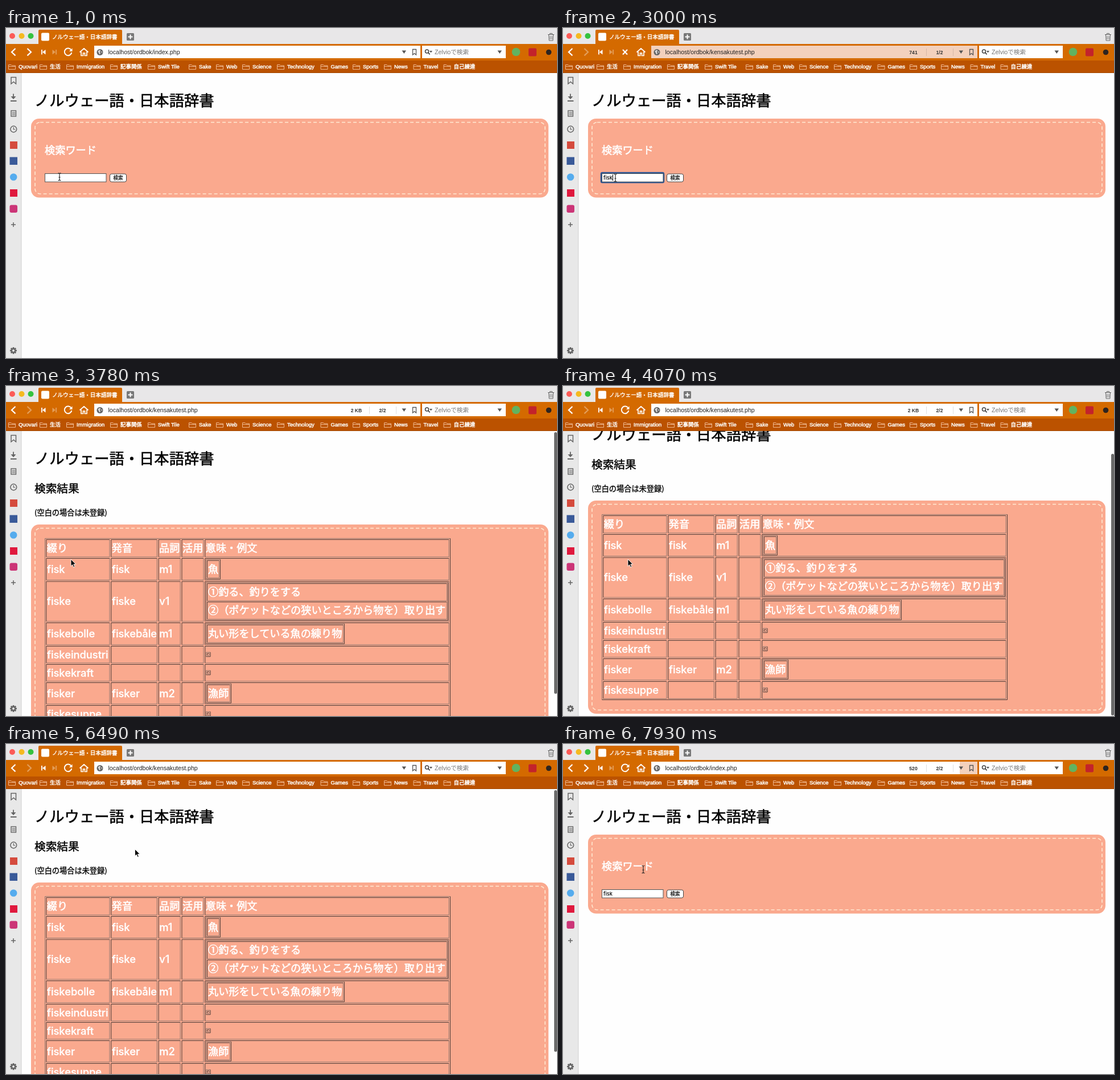
These frames come from a looping animation (968 by 579 pixels, 8 s). An HTML page:

```html
<!DOCTYPE html>
<html lang="ja">
<head>
<meta charset="utf-8">
<title>辞書</title>
<style>
html, body { margin: 0; width: 100%; height: 100%; overflow: hidden; background: #fff; }
svg { display: block; width: 100vw; height: 100vh; }
text { white-space: pre; }
.ui { font-family: 'Liberation Sans', 'Noto Sans CJK JP', 'Noto Sans CJK', sans-serif; }
.ja { font-family: 'Noto Sans CJK JP', 'Noto Sans CJK', sans-serif; }
.en { font-family: Inter, 'Noto Sans', sans-serif; font-weight: 500; }
</style>
</head>
<body>
<svg id="stage" viewBox="0 0 968 579" preserveAspectRatio="none"></svg>
<script>
const rect = (x, y, w, h, fill, more = '') =>
  `<rect x="${x}" y="${y}" width="${w}" height="${h}" fill="${fill}" ${more}/>`;
const disc = (x, y, r, fill, more = '') => `<circle cx="${x}" cy="${y}" r="${r}" fill="${fill}" ${more}/>`;
const line = (d, color, width = 1, more = '') =>
  `<path d="${d}" fill="none" stroke="${color}" stroke-width="${width}" ${more}/>`;
const shape = (d, fill, more = '') => `<path d="${d}" fill="${fill}" ${more}/>`;
// y is the optical middle of the line
const text = (x, y, s, size, fill, cls = 'ui', bold = 0, more = '') =>
  `<text class="${cls}" x="${x}" y="${y + size * .37}" font-size="${size}" fill="${fill}" ` +
  `stroke="${fill}" stroke-width="${bold}" ${more}>${s}</text>`;
const group = (id, body) => `<g id="${id}">${body}</g>`;

const ORANGE = '#d46a00', SALMON = '#faa98e', GREY = '#646464', DARK = '#3a3230', LIGHT = '#85736b';

function card(y, h) {
  return rect(44, y, 909, h, SALMON, 'rx="14"') +
    rect(51, y + 6.5, 896, h - 13, 'none', 'rx="9" stroke="#ffe9d2" stroke-width="1.6" stroke-dasharray="6 4"');
}

function searchForm() {
  return card(159, 138.5) +
    text(68, 214, '検索ワード', 18.2, '#fff', 'ja', .6) +
    rect(67, 254, 110, 17, 'none', 'id="ring" rx="2" stroke="#2b5797" stroke-width="2.4"') +
    rect(68.5, 255.5, 107.5, 14.5, '#fff', 'stroke="#555"') +
    text(71, 263, '', 9.2, '#000', 'en', 0, 'id="typed"') +
    rect(71, 257, 1, 11, '#000', 'id="caret"') +
    rect(182.5, 256, 29, 14, '#fff', 'rx="3" stroke="#444"') +
    text(197, 263, '検索', 8.6, '#000', 'ja', .2, 'text-anchor="middle"');
}

// Bevelled one-pixel borders, as browsers draw them around tables and cells
const bevel = (x1, y1, x2, y2, upper, lower) =>
  line(`M${x1 + .5} ${y2 - .5}V${y1 + .5}H${x2 - .5}`, upper, .9) +
  line(`M${x1 + .5} ${y2 - .5}H${x2 - .5}V${y1 + .5}`, lower, .9);
const inset = (x1, y1, x2, y2) => bevel(x1, y1, x2, y2, DARK, LIGHT);
const outset = (x1, y1, x2, y2) => bevel(x1, y1, x2, y2, LIGHT, DARK);

function resultTable() {
  const cols = [[70.3, 182.5], [184.3, 265.8], [267.6, 306.7], [308.5, 347.5], [349.3, 778.6]];
  // top, bottom, three short cells, width of the nested list, its lines
  const rows = [
    [302, 341, 'fisk', 'fisk', 'm1', 26, ['魚']],
    [342.5, 413.5, 'fiske', 'fiske', 'v1', 426, ['①釣る、釣りをする', '②（ポケットなどの狭いところから物を）取り出す']],
    [415, 454.5, 'fiskebolle', 'fiskebåle', 'm1', 244, ['丸い形をしている魚の練り物']],
    [456, 486.5, 'fiskeindustri', '', '', 8, []],
    [488, 518.5, 'fiskekraft', '', '', 8, []],
    [520, 558.5, 'fisker', 'fisker', 'm2', 45, ['漁師']],
    [560, 591, 'fiskesuppe', '', '', 8, []]
  ];
  const label = (x, y, s) => text(x, y, s, 18.15, '#fff', 'ja', .6);
  let out = outset(68, 267, 781, 593);
  ['綴り', '発音', '品詞', '活用', '意味・例文'].forEach((s, i) => {
    out += inset(cols[i][0], 269, cols[i][1], 300.5) + label(cols[i][0] + 1.5, 284.5, s);
  });
  for (const [top, bottom, word, sound, kind, w, items] of rows) {
    const mid = (top + bottom) / 2 - .5;
    cols.forEach(([a, b], i) => {
      out += inset(a, top, b, bottom) +
        text(a + 1.6, mid, [word, sound, kind][i] || '', 18.3, '#fff', 'en', .3);
    });
    if (!items.length) {
      out += outset(351, mid - 4, 359.5, mid + 4.5) + inset(353, mid - 2, 357.5, mid + 2.5);
      continue;
    }
    out += outset(351, top + 1.8, 351 + w, bottom - 1.8);
    const h = (bottom - top - 6.5) / items.length;
    items.forEach((s, i) => {
      const y = top + 3.2 + i * h;
      out += inset(353, y + .5, 349 + w, y + h - .5) + label(355, y + h / 2 - .4, s);
    });
  }
  return out;
}

function results() {
  return text(50, 180, '検索結果', 19.7, '#000', 'ja', .4) +
    text(50, 222, '(空白の場合は未登録)', 13.2, '#000', 'ja', .35) +
    card(243, 374) + resultTable();
}

function titleBar() {
  return rect(0, 0, 968, 28, '#e8e7e8') +
    disc(11, 14, 5, '#fc5b57') + disc(27.5, 14, 5, '#f5b91f') + disc(43.5, 14, 5, '#35c23f') +
    shape('M57 28V5q0-2 2-2H202q2 0 2 2V28Z', ORANGE) +
    rect(62, 8.5, 14, 14, '#fff', 'rx="2"') +
    text(81, 15.5, 'ノルウェー語・日本語辞書', 9.55, '#fff', 'ja', .4) +
    rect(212, 9, 13, 13, '#777', 'rx="1.5"') + line('M218.5 11.5v8M214.5 15.5h8', '#fff', 2) +
    line('M952 11.5h11M955.5 11v-1.5h4V11M953.5 12l.6 10h6.8l.6-10M956 14v6M959 14v6', GREY);
}

function toolBar() {
  return rect(0, 28, 968, 29, ORANGE) +
    line('M16.5 36 10 42.2l6.5 6.2', '#fff', 2.2) +
    line('M37.5 36 44 42.2l-6.5 6.2', '#fff', 2.2, 'id="forward"') +
    shape('M62 38h1.8v8.5H62ZM69.5 38v8.5L64 42.2Z', '#fff') +
    shape('M81.5 38v8.5L87 42.2ZM87.2 38H89v8.5h-1.8Z', '#fff', 'opacity=".35"') +
    group('reload', line('M114.4 38.5A6.3 6.3 0 1 0 115.3 43', '#fff', 2) + shape('M116.5 35.5v5.5H111Z', '#fff')) +
    group('stop', line('M105 38l8 8.5M113 38l-8 8.5', '#fff', 2.2)) +
    line('M129.5 42.5 137 35.8l7.5 6.7M132 41.5V48.5h3.5V44h3v4.5H142V41.5', '#fff', 1.7) +
    rect(155, 31, 573, 22, '#fff') +
    rect(155, 31, 573, 22, '#f3d1bd', 'id="fill"') +
    disc(165, 42.5, 5.5, '#666') +
    shape('M161.5 40.5l3-2 2 1.5-2 2 1.5 2-1.5 2.5-1.5-2.5ZM167 41l2 .5-1 3Z', '#ddd') +
    text(179.5, 42.5, '', 10.6, '#222', 'ui', 0, 'id="url"') +
    group('info',
      text(615.5, 42.5, '', 8.6, '#333', 'ui', 0, 'id="size" text-anchor="middle" font-weight="bold"') +
      text(661.5, 42.5, '', 8.6, '#333', 'ui', 0, 'id="count" text-anchor="middle" font-weight="bold"') +
      line('M638.5 36v13M685.5 36v13', '#000', 1, 'opacity=".12"')) +
    shape('M695.5 39.5h7.5l-3.7 5.5Z', '#555') +
    line('M714.5 37.5h6v9.5l-3-2.5-3 2.5Z', '#555', 1.3) +
    rect(731, 31, 147, 22, '#fff') +
    disc(739.5, 41, 3, 'none', 'stroke="#444" stroke-width="1.5"') + line('M741.6 43.2l3 3.2', '#444', 1.7) +
    shape('M744 40h5l-2.5 3.5Z', '#555') +
    text(753, 42.5, 'Zelvioで検索', 10.6, '#777') +
    shape('M863.5 39.5h7.5l-3.7 5.5Z', '#555') +
    disc(896, 42, 7.3, '#62b35f') + rect(918, 35.5, 14, 14, '#c3232b', 'rx="2"') +
    disc(953.5, 42.5, 4.8, '#2d2420');
}

function bookmarkBar() {
  const items = [[4, 'Quovari'], [59, '生活'], [106, 'Immigration'], [183, '記事関係'], [249, 'Swift Tile'],
    [321, 'Sake'], [369, 'Web'], [415, 'Science'], [476, 'Technology'], [552.5, 'Games'],
    [609, 'Sports'], [664, 'News'], [715.5, 'Travel'], [768.5, '自己練達']];
  return rect(0, 57, 968, 22, '#bb5200') + rect(0, 78, 968, 1, '#a34700') +
    items.map(([x, s]) =>
      line(`M${x + .5} 72.5v-8h4.5l1.5 1.5h6v6.5ZM${x + .5} 67.5h12`, '#f0b890', 1) +
      text(x + 18, 68, s, 9.45, '#fff', 'ui', .45)).join('');
}

function sideBar() {
  const teeth = [...Array(8)].map((_, i) =>
    rect(11.7, 560, 2.6, 3, GREY, `transform="rotate(${i * 45} 13 566)"`)).join('');
  return rect(0, 79, 27, 500, '#e8e8e8') + rect(26.5, 79, 1, 500, '#cfcfcf') +
    line('M9 86.5h8.5v11.5l-4.2-3.5L9 98Z', GREY, 1.5) +
    line('M13 115.5v8M8 128h10.5', GREY, 1.8) + shape('M8.5 120h9l-4.5 5Z', GREY) +
    rect(9, 145, 8.5, 10, 'none', `stroke="${GREY}" stroke-width="1.4"`) +
    line('M10.5 148h6M10.5 150.2h6M10.5 152.4h6', GREY) +
    disc(13.3, 177.5, 5.4, 'none', `stroke="${GREY}" stroke-width="1.5"`) +
    line('M13.3 174v4h3', GREY, 1.2) +
    rect(7, 199, 13, 13, '#d54b3d') + rect(6.5, 226.5, 13.5, 13.5, '#3a5a99') +
    disc(13.2, 261.5, 6.3, '#55acee') + rect(7, 283, 13, 13, '#e0193e') +
    rect(6.5, 310.5, 13.5, 13.5, '#cc3577', 'rx="3"') +
    line('M13 341v8M9 345h8', GREY, 1.5) +
    teeth + disc(13, 566, 3.2, 'none', `stroke="${GREY}" stroke-width="2.4"`);
}

document.getElementById('stage').innerHTML =
  rect(0, 0, 968, 579, '#fefefe') +
  group('page',
    text(50, 127.5, 'ノルウェー語・日本語辞書', 26.3, '#000', 'ja', .6) +
    group('form', searchForm()) + group('results', results())) +
  rect(963, 81, 5, 459, '#6b6b6b', 'id="thumb" rx="2.5"') +
  titleBar() + toolBar() + bookmarkBar() + sideBar() +
  group('beam', line('M-2.5-6.5q2.5 0 2.5 1.5V5q0 1.5-2.5 1.5M2.5-6.5Q0-6.5 0-5V5q0 1.5 2.5 1.5M-1.5 1h3', '#222', 1.1)) +
  group('arrow', shape('M0 0V12.2l2.8-2.6 2 4.4 2-.9-2-4.3h3.9Z', '#000', 'stroke="#fff" stroke-width=".9"'));

const LOOP = 8000;
const steps = [
  [0, { found: 0, url: 'index', focus: 0, typed: '', caret: 0, busy: 0, fill: 728, size: '', count: '',
        info: 0, forward: 1, scroll: 0, beam: 1, x: 94, y: 261 }],
  [150, { focus: .6 }],
  [330, { focus: 1, caret: 1, x: 92, y: 263 }],
  [780, { caret: 0 }],
  [1220, { caret: 1 }],
  [1820, { caret: 0 }],
  [2110, { typed: 'f', caret: 1 }],
  [2260, { typed: 'fi' }],
  [2410, { typed: 'fis' }],
  [2560, { typed: 'fisk' }],
  [2850, { url: 'kensakutest', busy: 1, fill: 155, info: 1, size: '0', count: '0/1', forward: 0 }],
  [3000, { size: '741', count: '1/2' }],
  [3150, { found: 1, size: '2 KB', count: '2/2', fill: 697 }],
  [3300, { busy: 0, fill: 728, beam: 0, x: 93, y: 266 }],
  [3450, { x: 100, y: 281 }],
  [3600, { x: 110, y: 298 }],
  [3780, { x: 114, y: 304 }],
  [3920, { scroll: 16 }],
  [4070, { scroll: 42 }],
  [4670, { info: .66 }],
  [4830, { info: .33 }],
  [4990, { info: 0 }],
  [5740, { x: 134, y: 287 }],
  [5890, { x: 172, y: 244 }],
  [6040, { x: 212, y: 200 }],
  [6190, { x: 226.5, y: 184.5 }],
  [6490, { scroll: 0 }],
  [7240, { x: 216, y: 192 }],
  [7420, { url: 'index', busy: 1, fill: 155, info: 1, size: '0', count: '0/1', forward: 1, x: 202, y: 200 }],
  [7600, { fill: 451, size: '159' }],
  [7750, { found: 0, typed: 'fisk', focus: 0, caret: 0, fill: 640, size: '520', count: '1/2', x: 186, y: 206 }],
  [7930, { busy: 0, fill: 697, count: '2/2', beam: 1, x: 141, y: 220 }]
];

const el = {};
document.querySelectorAll('[id]').forEach(n => el[n.id] = n);
const show = (node, on) => node.setAttribute('display', on ? 'inline' : 'none');
const set = (node, name, value) => node.setAttribute(name, value);

function render(t) {
  const s = Object.assign({}, ...steps.filter(([at]) => at <= t).map(step => step[1]));
  show(el.form, !s.found);
  show(el.results, s.found);
  show(el.thumb, s.found);
  set(el.page, 'transform', `translate(0 ${-s.scroll})`);
  set(el.thumb, 'y', 81 + s.scroll * 38 / 42);

  set(el.ring, 'opacity', s.focus);
  el.typed.textContent = s.typed;
  show(el.caret, s.caret);
  if (!s.found) set(el.caret, 'x', 71 + Math.round(el.typed.getComputedTextLength()));

  el.url.textContent = `localhost/ordbok/${s.url}.php`;
  el.size.textContent = s.size;
  el.count.textContent = s.count;
  set(el.info, 'opacity', s.info);
  set(el.fill, 'x', s.fill);
  set(el.fill, 'width', 728 - s.fill);
  set(el.forward, 'opacity', s.forward ? 1 : .35);
  show(el.reload, !s.busy);
  show(el.stop, s.busy);

  const at = `translate(${s.x} ${s.y})`;
  set(el.beam, 'transform', at);
  set(el.arrow, 'transform', at);
  show(el.beam, s.beam);
  show(el.arrow, !s.beam);
}

const start = performance.now();
function tick() {
  render((performance.now() - start) % LOOP);
  requestAnimationFrame(tick);
}
tick();
</script>
</body>
</html>
```
